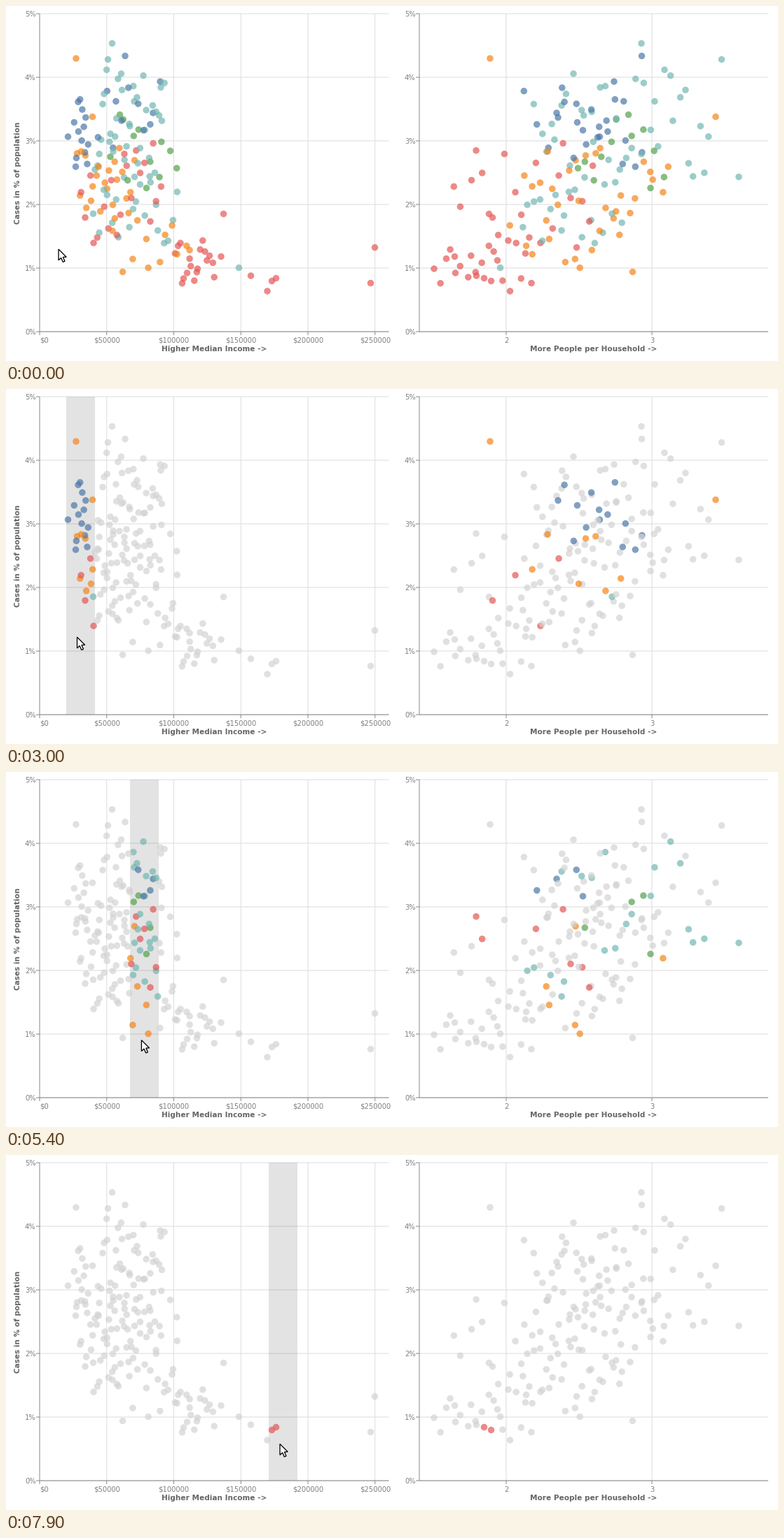
A matplotlib script for the animation above (8 s loop, 1102 by 508 pixels).

```python
import numpy as np
import matplotlib.pyplot as plt
from matplotlib.animation import FuncAnimation
from matplotlib.colors import to_rgba
from matplotlib.patches import Polygon, Rectangle

W, H, DPI = 1102, 508, 100
PX = 72 / DPI
STEP, FRAMES = 100, 80
TOP, BASE = 11.5, 466.5
LEFT, RIGHT = (47.5, 546), (589.5, 1087.5)
BRUSH_X, BRUSH_W = 54, 41
PRESS, RELEASE, DRAG, END = 1000, 1700, 2200, 7900

BLUE, ORANGE, RED, TEAL, GREEN = "#4c78a8", "#f58518", "#e45756", "#72b7b2", "#54a24b"
GREY = to_rgba("lightgray", 0.7)

# Extremes: colour, income x, household x, rate y
EXTREMES = [
    (RED, 526, 814, 346), (RED, 520, 749.5, 397), (RED, 385, 682, 390),
    (RED, 379, 692, 394), (RED, 372.5, 719, 408.5), (RED, 349, 671, 386.5),
    (RED, 310, 689, 298), (RED, 306.5, 640, 359), (TEAL, 332, 705, 375),
    (TEAL, 145, 1021, 77), (TEAL, 151, 906.5, 54), (TEAL, 183, 1045.5, 245),
    (BLUE, 88, 847, 187.5), (BLUE, 169.5, 907, 72), (ORANGE, 99.5, 690.5, 75.5),
    (ORANGE, 123, 1012.5, 159),
]

# Clouds: colour, count, income range, household range, rate range
CLOUDS = [
    (BLUE, 13, (96, 118), (785, 910), (128, 236)),
    (BLUE, 11, (127, 226), (732, 893), (102, 205)),
    (GREEN, 12, (147, 245), (811, 945), (152, 268)),
    (ORANGE, 22, (98, 184), (738, 950), (200, 300)),
    (ORANGE, 13, (143, 270), (717, 897), (300, 383)),
    (RED, 18, (239, 299), (608, 745), (335, 400)),
    (RED, 20, (105, 224), (635, 845), (196, 345)),
    (TEAL, 36, (125, 227), (752, 1007), (90, 245)),
    (TEAL, 20, (122, 246), (735, 882), (245, 342)),
]


def make_points():
    rng = np.random.default_rng(12)

    def spread(lo, hi, n):
        cells = rng.permutation(n) + rng.uniform(0.1, 0.9, n)
        return lo + (hi - lo) * cells / n

    rows = list(EXTREMES)
    for col, n, *ranges in CLOUDS:
        rows += zip([col] * n, *(spread(*r, n) for r in ranges))
    rng.shuffle(rows)
    return np.array([r[1:] for r in rows]), np.array([to_rgba(r[0], 0.7) for r in rows])


# Time and left edge of the brush while it is dragged
BRUSH_KEYS = [(DRAG, BRUSH_X), (3000, 85), (4000, 129), (4600, 140), (5200, 164),
              (6200, 228.5), (6500, 231), (7300, 300.5), (END, 374.5)]
# Time, offset of the pointer from the brush edge, and its height
POINTER_KEYS = [(400, 20.5, 348.5), (800, 0, 320), (PRESS, 0, 320),
                (RELEASE, BRUSH_W, 434), (DRAG, 16, 346), (END, 16, 414)]


def at(keys, t, k=1):
    return np.interp(t, [key[0] for key in keys], [key[k] for key in keys])


fig = plt.figure(figsize=(W / DPI, H / DPI), dpi=DPI, facecolor="white")
ax = fig.add_axes([0, 0, 1, 1])
# Half a pixel of offset gives the lines their soft two-pixel edge
ax.set_xlim(-0.5, W - 0.5)
ax.set_ylim(H + 0.5, 0.5)
ax.axis("off")


def line(x0, y0, x1, y1, color, z):
    ax.plot([x0, x1], [y0, y1], color=color, lw=PX, zorder=z, snap=False,
            solid_capstyle="butt")


def label(x, y, s, ha="center"):
    ax.text(x, y, s, size=10 * PX, color="#808080", ha=ha, va="center_baseline",
            family="DejaVu Sans")


def title(x, y, s, rotation=0):
    ax.text(x, y, s, size=10.5 * PX, color="#666666", weight="bold", ha="center",
            va="center", rotation=rotation, family="DejaVu Sans")


def chart(span, ticks, name):
    x0, x1 = span
    for i in range(6):
        y = BASE - 91 * i
        line(x0, y, x1, y, "#dddddd", 1)
        line(x0 - 5, y, x0, y, "#888888", 5)
        label(x0 - 5.5, y, f"{i}%", "right")
    for x, s in ticks:
        if x > x0:
            line(x, TOP, x, BASE, "#dddddd", 1)
        line(x, BASE, x, BASE + 5, "#888888", 5)
        label(x if x > x0 else x0 + 6.5, 478, s)
    line(x0, TOP, x0, BASE, "#888888", 5)
    line(x0, BASE, x1, BASE, "#888888", 5)
    title((x0 + x1) / 2, 492, name)


chart(LEFT, [(LEFT[0] + 95.75 * i, f"${50000 * i}") for i in range(6)],
      "Higher Median Income ->")
chart(RIGHT, [(713.5, "2"), (921.5, "3")], "More People per Household ->")
title(17, 239, "Cases in % of population", 90)

points, colours = make_points()
dots = [ax.scatter(points[:, k], points[:, 2], s=(9.5 * PX) ** 2, c=colours,
                   linewidths=0, zorder=3) for k in (0, 1)]
brush = ax.add_patch(Rectangle((BRUSH_X, TOP), 0, BASE - TOP - 0.5, fc="#333333",
                               alpha=0.135, lw=0, zorder=2))
ARROW = np.array([(0, 0), (0, 15.8), (3.6, 12.4), (6.3, 18.4), (9, 17.2),
                  (6.4, 11.4), (11.2, 11.2)])
cursor = ax.add_patch(Polygon(ARROW, fc="white", ec="black", lw=1.3 * PX, zorder=9,
                              joinstyle="miter"))


def draw(i):
    t = i * STEP
    x, grip = at(BRUSH_KEYS, t), at(POINTER_KEYS, t)
    active = t > PRESS
    width = grip if t < RELEASE else BRUSH_W
    brush.set_visible(active)
    brush.set_x(x)
    brush.set_width(width)
    shown = colours
    if active:
        inside = (points[:, 0] >= x) & (points[:, 0] <= x + width)
        shown = np.where(inside[:, None], colours, GREY)
    for d in dots:
        d.set_facecolors(shown)
    cursor.set_xy(ARROW + (x + grip, at(POINTER_KEYS, t, 2)))
    return [*dots, brush, cursor]


anim = FuncAnimation(fig, draw, frames=FRAMES, interval=STEP, repeat=True,
                     repeat_delay=0, blit=False)
plt.show()
```
